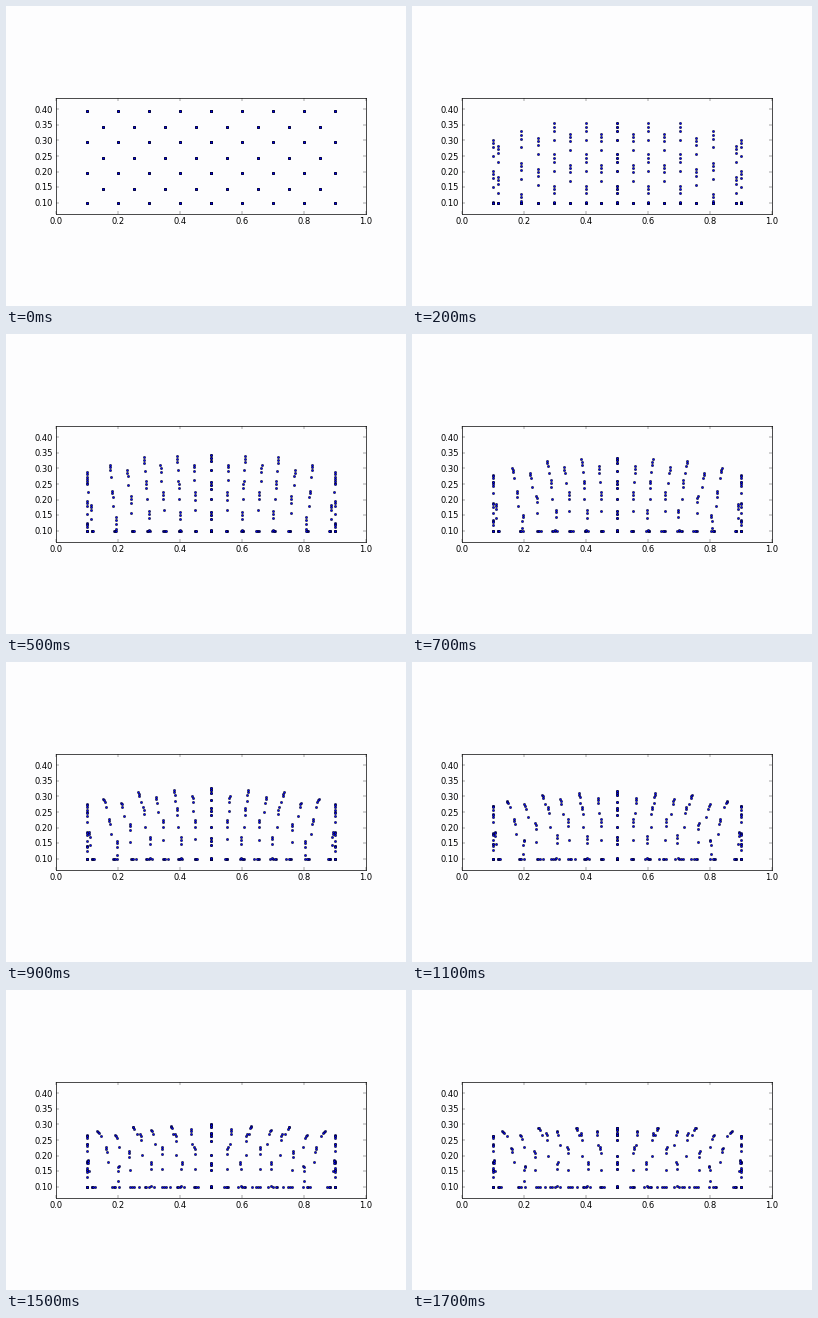
These frames come from a looping animation (400x300 px, 1800 ms). A matplotlib script:

```python
import numpy as np
import matplotlib.pyplot as plt
from matplotlib.animation import FuncAnimation

FRAMES, INTERVAL = 18, 100
SCALE = 310            # stage pixels per data unit
FLOOR, WALL, CENTER = 196, 81, 205
PITCH = 15.5           # lattice spacing in pixels
FIRST_DROP = 1.55
PAPER = "#fdfdfe"
SPLIT = np.array([0, 0.2, 0.45, 1])   # how far the copies at a node part

plt.rcParams.update({
    "font.family": "DejaVu Sans",
    "font.size": 12,
    "axes.linewidth": 1.0,
    "xtick.direction": "in", "ytick.direction": "in",
    "xtick.top": True, "ytick.right": True,
    "xtick.major.size": 4, "ytick.major.size": 4,
    "xtick.major.width": 0.5, "ytick.major.width": 0.5,
    "xtick.major.pad": 4, "ytick.major.pad": 4,
})


def node(col, row):
    """Start, landed and settled places of the copies at one lattice node."""
    x0 = WALL + PITCH * col
    rest_y = FLOOR - PITCH * row
    y0 = min(rest_y + FIRST_DROP, FLOOR)
    edge = max(0, 1 - col / 4)

    # Landing: free fall, with the outer columns sagging to the wall.
    lean = 12.5 * (1 - col / 8) / max(col, 1) ** 1.6
    x1 = x0 - lean
    drop = 9 if row % 2 else 14
    y1 = rest_y + drop + 16 * edge + 16 * SPLIT if row > 1 else FLOOR

    # Settling: upper rows slide outwards, lower ones squash to the floor.
    shear = 19 * np.sin((8 - col) * np.pi / 12)
    shear *= np.interp(row, [0, 2, 3, 4, 5], [0, -0.2, 0.2, 0.5, 1])
    x2 = x1 - shear * (1 - 0.25 * SPLIT)
    if row < 2:
        x2 = x2 + 10 * (SPLIT - 0.4) * np.sin(np.pi * col / 8)
    level = np.interp(row, [1, 2, 3, 4, 6], [FLOOR, 171, 156, 143, 137])
    sag = edge * np.interp(row, [2, 4, 6], [8, 28, 8])
    spread = (1 - 0.7 * edge) * np.interp(row, [2, 4, 6], [24, 22, 7])
    y2 = level + sag + spread * SPLIT ** 1.5

    power = 2.2 - 0.16 * col
    return np.broadcast_arrays(x0, y0, x1, y1, x2, y2, power, SPLIT)[:7]


# Left half only, the right half mirrors it.
nodes = [node(col, row) for col in range(9) for row in range(col % 2, 7, 2)]
X0, Y0, X1, Y1, X2, Y2, POWER = np.concatenate(nodes, axis=1)
Y1 = np.minimum(Y1, FLOOR)


def positions(n):
    if n < 2:
        fall = ((n + 1) ** 2 - 1) / 8
        x = X0 + fall * (X1 - X0)
        y = Y0 + fall * (Y1 - Y0)
    else:
        rest = 1 - (n - 2) / (FRAMES - 3)
        x = X1 + (1 - rest ** 1.5) * (X2 - X1)
        y = Y1 + (1 - rest ** POWER) * (Y2 - Y1)
    x, y = np.maximum(x, WALL), np.minimum(y, FLOOR)
    x = np.concatenate([x, 2 * CENTER - x])
    y = np.concatenate([y, y])
    return np.column_stack([(x - 50) / SCALE, 0.1 + (FLOOR - y) / SCALE])


fig = plt.figure(figsize=(8, 6), dpi=50, facecolor=PAPER)
ax = fig.add_axes([0.125, 0.1, 0.775, 0.8], facecolor=PAPER)
ax.set_aspect("equal")
ax.set_xlim(0, 1)
ax.set_ylim(0.0625, 0.4375)
ax.set_xticks(np.arange(6) * 0.2)
ax.set_yticks(0.1 + np.arange(7) * 0.05)
ax.xaxis.set_major_formatter("{x:.1f}")
ax.yaxis.set_major_formatter("{x:.2f}")

dots = ax.scatter(*positions(0).T, s=10, c="blue", edgecolors="black",
                  linewidths=0.7, zorder=3, snap=False)


def draw(n):
    dots.set_offsets(positions(n))
    return [dots]


anim = FuncAnimation(fig, draw, frames=FRAMES, interval=INTERVAL,
                     repeat=True, repeat_delay=0, blit=False)
plt.show()
```
